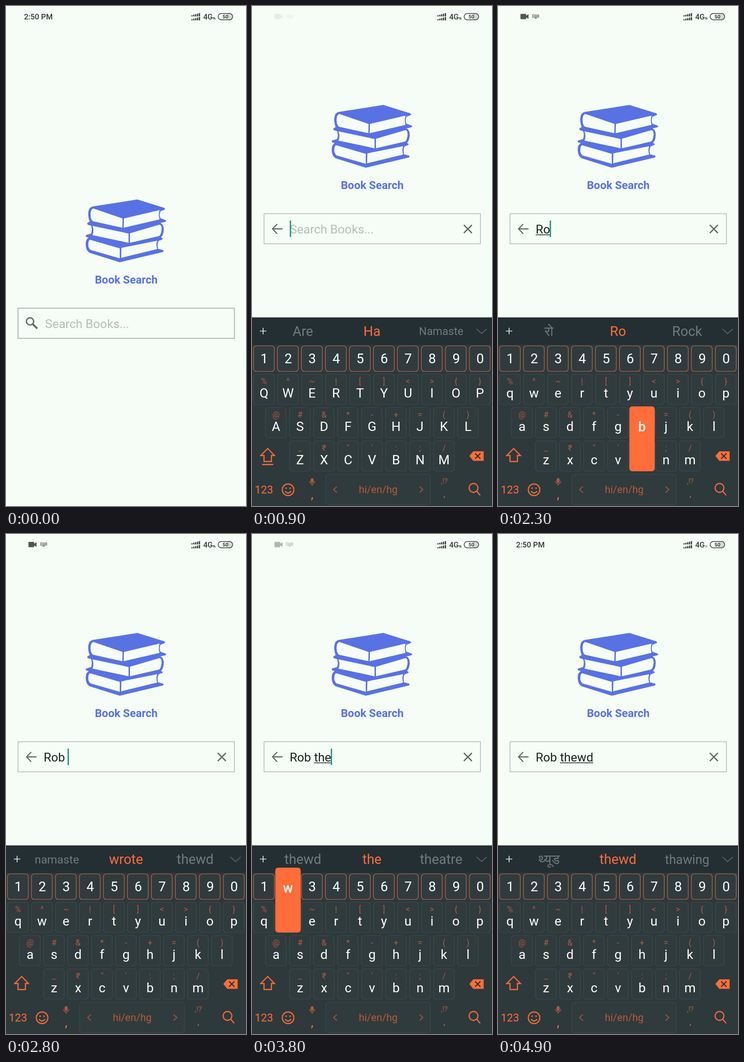
Animation, 519 px wide and 1079 px high, one loop 5 s. Source, as an HTML page:

```html
<!DOCTYPE html>
<html lang="en">
<head>
<meta charset="utf-8">
<title>Book Search</title>
<style>
  html, body { margin: 0; width: 100%; height: 100%; overflow: hidden; background: #f6fcf6; }
  svg { display: block; width: 100%; height: 100%; font-family: Roboto, "Noto Sans", sans-serif; }
  text { white-space: pre; }
  .mid { text-anchor: middle; }
  .line { fill: none; stroke-linejoin: miter; }
  .hot { fill: #ff6d3a; }
  .dim { fill: #b9593a; }
</style>
</head>
<body>
<svg id="stage" viewBox="0 0 519 1079" xmlns="http://www.w3.org/2000/svg">
  <rect width="519" height="1079" fill="#f6fcf6"/>
  <rect id="blank" y="672" width="519" height="407" fill="#fdfefd"/>

  <g id="status" fill="#343a36">
    <text id="clock" x="39" y="29" font-size="16.6" font-weight="500">2:50 PM</text>
    <g id="notes" fill="#515652">
      <rect x="48.5" y="17" width="12.5" height="11.5" rx="1.5"/>
      <path d="M61 21 L66 17.5 V28 L61 24.5Z"/>
      <path d="M75 19H88V24.5H75Z" fill="none" stroke="#515652" stroke-width="1.6" stroke-dasharray="1.7 .9"/>
      <path d="M77 21.8H87M79 26H84" stroke="#515652" stroke-width="1.6"/>
    </g>
    <g id="signal"></g>
    <text x="426.5" y="29" font-size="16.4" font-weight="500">4G</text>
    <path id="data" d="M448.6 29V24.5M447 26L448.6 24L450.2 26M451.5 24V28.5M450 27L451.5 29L453 27" class="line" stroke="#343a36" stroke-width="1"/>
    <rect x="458.8" y="16.3" width="31.4" height="13.4" rx="6.7" fill="#fbfefb"/>
    <path d="M478 16.3H483.5A6.7 6.7 0 0 1 483.5 29.7H478Z" fill="#d5dad6"/>
    <rect x="458.8" y="16.3" width="31.4" height="13.4" rx="6.7" fill="none" stroke="#343a36" stroke-width="1.5"/>
    <text class="mid" x="474.5" y="27" font-size="11" font-weight="700">50</text>
  </g>

  <g id="page">
    <g fill="#5872e4">
      <path d="M188 432.5L284 417.5L342 435.5Q346 438 342 440L334 443Q331 451 334 458L345 462Q348 464 344 466L334 468Q342 472 341 484Q340 496 335 499L339 502Q339 504 335 505L330 507Q326 515 329 524L340 527Q342 529 339 531L246 553L182 533Q172 529 172.500 512Q173 503 179 500L173 498Q171 496 174 494L184 491Q187 482 184 474L177 472Q174 469 178 467L181 465Q177 456 178 446Q179 434 188 432.500Z"/>
      <g fill="#f6fcf6">
        <path d="M189 437L252 458.500L251.500 478.500L188 464.500Q182 460 183 447Q184 438 189 437Z"/>
        <path d="M255 458.500L332 440.500Q329 450 332 460.500L254.500 478.500Z"/>
        <path d="M187 474.500L265 491L265 511L187 494.500Q191 485 187 474.500Z"/>
        <path d="M268 490.500L331 472Q337 471 336.500 483Q335 494 331 496.500L268 511Z"/>
        <path d="M182 504.500L246 523L246 544.500L183 526.500Q177 522 178 513Q178.500 505 182 504.500Z"/>
        <path d="M249.500 522L327 506.500Q323.500 515 327 524.500L249 543.500Z"/>
      </g>
      <text class="mid" x="260" y="598.5" font-size="23.9" font-weight="700">Book Search</text>
    </g>
    <rect id="box" x="26" y="652.2" width="468" height="65" fill="none" stroke="#a4aea7"/>
    <g id="idle" class="line" stroke="#696d69">
      <circle cx="52" cy="680.5" r="7.8" stroke-width="3"/>
      <path d="M57.500 686L67.500 696" stroke-width="4"/>
    </g>
    <g id="active" class="line" stroke="#626863">
      <path d="M54.500 674.500L44.500 685L54.500 695.500M44.500 685H66" stroke-width="2.5"/>
      <path d="M458 676.500L475.500 694M475.500 676.500L458 694" stroke-width="2.700"/>
    </g>
    <text id="hint" y="695" font-size="26.4" fill="#b6beb8">Search Books...</text>
    <text id="query" x="81.500" y="695" font-size="26.4" fill="#1b211d"></text>
    <rect id="under" y="697" height="1.500" fill="#1b211d"/>
    <rect id="caret" y="667" width="2.800" height="35.500" fill="#159684"/>
  </g>

  <g id="board">
    <rect y="672" width="519" height="407" fill="#2e393b"/>
    <rect y="672" width="519" height="59" fill="#242f33"/>
    <path d="M17 701.500H31M24 694.500V708.500" stroke="#e6eaea" stroke-width="1.700"/>
    <g id="hints" class="mid"></g>
    <path d="M485.500 697L496.500 707L507.500 697" class="line" stroke="#566265" stroke-width="2"/>
    <g id="keys"></g>
    <path d="M34 955L48.500 970H42V983H26V970H19Z" class="line" stroke="#ff6d3a" stroke-width="2.400"/>
    <path id="lock" d="M22 989.500H46" stroke="#ff6d3a" stroke-width="2.600"/>
    <path class="hot" d="M470 971L478.500 961H501V981.500H478.500Z"/>
    <path d="M482.500 965.500L494 977M494 965.500L482.500 977" stroke="#243034" stroke-width="2.400"/>
    <text class="hot" x="6" y="1052" font-size="23.5">123</text>
    <g class="line" stroke="#ff6d3a" stroke-width="2.300">
      <circle cx="78" cy="1044" r="12.500"/>
      <path d="M71.500 1047Q78 1055 84.500 1047"/>
      <circle cx="479" cy="1040" r="9.500"/>
      <path d="M486 1047L493.500 1056"/>
    </g>
    <circle class="hot" cx="73.700" cy="1040.500" r="1.700"/>
    <circle class="hot" cx="82.300" cy="1040.500" r="1.700"/>
    <rect class="dim" x="127" y="1019" width="6" height="10" rx="3"/>
    <path d="M124.500 1025Q125 1031.500 130 1031.500Q135 1031.500 135.500 1025M130 1031V1035" class="line" stroke="#b9593a" stroke-width="1.600"/>
    <text class="hot mid" x="130" y="1063" font-size="28">,</text>
    <rect id="space" x="159.500" y="1010.500" width="226" height="66" rx="6" stroke="#414c4f"/>
    <text class="dim mid" x="273" y="1050.500" font-size="22">hi/en/hg</text>
    <path d="M183.500 1037L176.500 1043.500L183.500 1050M362.500 1037L369.500 1043.500L362.500 1050" class="line" stroke="#a9543a" stroke-width="1.800"/>
    <text class="dim mid" x="416" y="1031" font-size="16">,!?</text>
    <text class="hot mid" x="416" y="1061" font-size="23">.</text>
    <g id="popup">
      <rect id="bubble" width="55" height="140" rx="6" fill="#ff6d3a"/>
      <text id="big" class="mid" font-size="29" font-weight="500" fill="#fff"></text>
    </g>
  </g>
</svg>
<script>
const LOOP = 5000, STEP = 100, PITCH = 51.88;
const FOCUS = 500, RESIZE = 700, FIRST = 1700;
const $ = id => document.getElementById(id);
const show = (id, on) => $(id).setAttribute('visibility', on ? 'inherit' : 'hidden');
const set = (id, attrs) => { for (const k in attrs) $(id).setAttribute(k, attrs[k]); };

// time, typed text, three suggestions
const typing = [
  [0, '', 'Are', 'Ha', 'Namaste'],
  [1700, 'R', 'आर', 'R', 'Right'],
  [2100, 'Ro', 'रो', 'Ro', 'Rock'],
  [2400, 'Rob', 'रॉब', 'Rob', 'Robot'],
  [2700, 'Rob ', 'namaste', 'wrote', 'thewd'],
  [3100, 'Rob t', 'to', 't', 'the'],
  [3400, 'Rob th', 'the', 'th', 'that'],
  [3600, 'Rob the', 'thewd', 'the', 'theatre'],
  [3900, 'Rob thew', 'थ्यू', 'thew', 'thewd'],
  [4200, 'Rob thewd', 'थ्यूड', 'thewd', 'thawing']
];
// start, end, key
const presses = [
  [1500, 1700, 'R'], [2000, 2100, 'o'], [2300, 2400, 'b'], [2600, 2700, ' '],
  [3000, 3100, 't'], [3300, 3400, 'h'], [3500, 3600, 'e'], [3800, 3900, 'w'], [4100, 4200, 'd']
];
const slide = [[600, 407], [700, 200], [800, 50], [900, 0]];
const clockFade = [[700, 1], [900, 0], [3900, 0], [4200, 1]];
const noteFade = [[800, 0], [900, .09], [1200, 1], [3600, 1], [3800, .42], [4000, 0]];

function ramp(table, t) {
  if (t <= table[0][0]) return table[0][1];
  for (let i = 1; i < table.length; i++) {
    const [a, va] = table[i - 1], [b, vb] = table[i];
    if (t <= b) return va + (vb - va) * (t - a) / (b - a);
  }
  return table[table.length - 1][1];
}

const pen = document.createElement('canvas').getContext('2d');
function textWidth(s, size) {
  pen.font = `${size}px Roboto, "Noto Sans", sans-serif`;
  return pen.measureText(s).width;
}

const esc = s => s.replace(/&/g, '&amp;').replace(/</g, '&lt;');
const label = (s, x, y, size, fill, extra = '') =>
  `<text class="mid" x="${x}" y="${y}" font-size="${size}" fill="${fill}" ${extra}>${esc(s)}</text>`;
const keyBox = (cx, y, h, stroke) =>
  `<rect x="${cx - 22.5}" y="${y}" width="45" height="${h}" rx="6" fill="#303b3d" stroke="${stroke}" stroke-width="1.2"/>`;

const spots = {};
function buildKeys() {
  let out = '';
  [...'1234567890'].forEach((d, i) => {
    const x = 26 + i * PITCH;
    out += keyBox(x - .3, 733.5, 55, '#c8694a') + label(d, x + .5, 771, 29, '#fff');
  });
  const rows = [
    ['qwertyuiop', '%^~|[]<>{}', 26],
    ['asdfghjkl', '@#&*-+=()', 52],
    ['zxcvbnm', '_₹"\':;/', 104]
  ];
  rows.forEach(([letters, marks, x0], r) => [...letters].forEach((c, i) => {
    const x = x0 + i * PITCH, y = 794.5 + r * 72;
    spots[c] = [x, y];
    out += keyBox(x - .3, y, 65.5, '#3f4a4d') + label(marks[i], x, y + 21.5, 17.5, '#b9593a')
      + label(c, x, y + 50, 28, '#fff', `data-key="${c}"`);
  }));
  $('keys').innerHTML = out;
}

function buildSignal() {
  let out = '';
  for (const base of [22.5, 31]) for (let i = 0; i < 5; i++) {
    const h = 2.5 + i * 1.15;
    out += `<rect x="${401 + i * 4}" y="${base - h}" width="2.6" height="${h}"/>`;
  }
  $('signal').innerHTML = out;
}

function drawHints(words) {
  $('hints').innerHTML = words.map((w, i) => {
    const size = Math.min(29.3, 96 / textWidth(w, 1000) * 1000);
    return label(w, 110 + i * 149.5, 702 + size * .35, size, i === 1 ? '#ff6d3a' : '#717b7c');
  }).join('');
}

function drawQuery(text, t, since) {
  const focused = t >= FOCUS, left = 81.5;
  const wordAt = text.lastIndexOf(' ') + 1;
  const start = left + textWidth(text.slice(0, wordAt), 26.4);
  const end = left + textWidth(text, 26.4);
  $('query').textContent = text;
  set('under', { x: start, width: end - start });
  set('caret', { x: text ? end - 1 : 81.7 });
  show('caret', focused && Math.floor((t - since) / 500) % 2 === 0);
  show('hint', !text);
  set('hint', { x: focused ? 81.5 : 84.5 });
  show('idle', !focused);
  show('active', focused);
}

function drawPress(t) {
  const hit = presses.find(([a, b]) => t >= a && t < b);
  const key = hit && hit[2];
  set('space', { fill: key === ' ' ? '#465154' : '#303b3d' });
  const spot = key && spots[key.toLowerCase()];
  show('popup', !!spot);
  if (!spot) return;
  const [x, y] = spot;
  set('bubble', { x: x - 27.5, y: y - 74.5 });
  set('big', { x, y: y - 21 });
  $('big').textContent = key;
}

let last = -1;
function render(t) {
  if (t === last) return;
  last = t;
  const now = typing.filter(row => row[0] <= t).pop();
  const resized = t >= RESIZE, caps = t < FIRST;
  set('page', { transform: `translate(0 ${resized ? -204 : 0})` });
  set('box', { 'stroke-width': resized ? 1.3 : 1.7 });
  show('blank', resized);
  set('board', { transform: `translate(0 ${ramp(slide, t)})` });
  set('clock', { opacity: ramp(clockFade, t) });
  set('notes', { opacity: ramp(noteFade, t) });
  set('data', { opacity: t >= 4800 ? .5 : 1 });
  show('lock', caps);
  for (const el of letters) {
    const c = el.dataset.key;
    el.textContent = caps ? c.toUpperCase() : c;
  }
  drawHints(now.slice(2));
  drawQuery(now[1], t, Math.max(now[0], FOCUS));
  drawPress(t);
}

buildSignal();
buildKeys();
const letters = document.querySelectorAll('[data-key]');
const began = performance.now();
function tick() {
  const t = (performance.now() - began) % LOOP;
  render(Math.floor(t / STEP) * STEP);
  requestAnimationFrame(tick);
}
tick();
</script>
</body>
</html>
```
